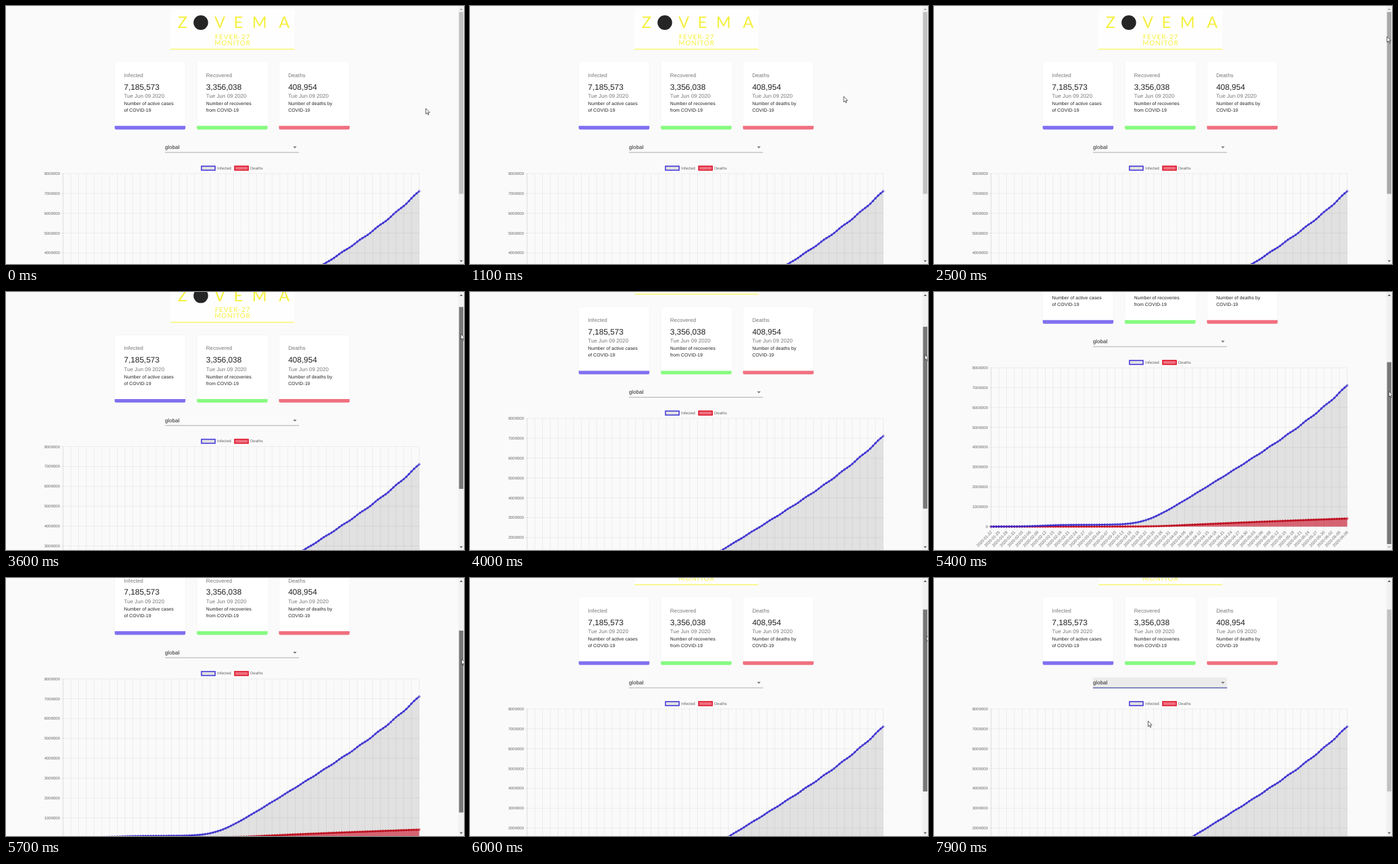
Recreate the animation shown at these times as an HTML page. Size 690 by 388 pixels, loop 8000 ms.

```html
<!DOCTYPE html>
<html lang="en">
<head>
<meta charset="utf-8">
<title>Case tracker</title>
<style>
  html, body { margin: 0; width: 100%; height: 100%; overflow: hidden; background: #fafafa; }
  svg { display: block; width: 690px; height: 388px; }
  text { font-family: "Liberation Sans", Arial, sans-serif; text-rendering: geometricPrecision; }
  .body { font-size: 8px; letter-spacing: .075px; }
  .soft { fill: #757575; }
  .dark { fill: #212121; }
  .count { font-size: 12px; }
  .note { font-size: 7px; letter-spacing: .075px; }
  .axis { font-size: 6px; fill: #666; }
  .logo { font-family: Lato, "Open Sans", sans-serif; fill: #f5f03c; text-anchor: middle; }
  .big { font-size: 24px; }
  .small { font-size: 10px; letter-spacing: 1px; }
  .card { filter: drop-shadow(0 .5px .7px rgba(0, 0, 0, .14)); }
</style>
</head>
<body>
<svg id="stage" viewBox="0 0 690 388"></svg>
<script>
const LOOP = 8000, STEP = 100;
const BLUE = '#3b2fd9', RED = '#dc0a1e', GREY = 'rgba(0,0,0,.1)', PINK = 'rgba(230,0,30,.55)';
const LEFT = 86, RIGHT = 622.5, TOP = 252, BASE = 490.8, DAYS = 138;
const MAX_SCROLL = 138, THUMB_TRAVEL = 96.5;
const PRESS = 3100, RELEASE = 6000, FOCUS = 7200;

const clamp = k => Math.max(0, Math.min(1, k));
const span = (t, from, to) => clamp((t - from) / (to - from));
const smooth = k => k * k * (3 - 2 * k);

// Growth in millions: flat until its onset, then rising
const onset = (day, start) => 4 * Math.log(1 + Math.exp((day - start) / 4));
function infected(day) {
  const s = onset(day, 59.6);
  const early = .09 / (1 + Math.exp((20 - day) / 4));
  const week = .0003 * s * Math.cos(2 * Math.PI * (day - 3) / 7);
  return early + .0798 * s + 2.6e-10 * s ** 5 + week;
}
const deaths = day => .0122 * onset(day, 66) ** .82;

// Pointer stops before and after the scrollbar drag: [ms, x, y]
const GRIP = [685.3, 49];
const ARRIVE = [[0, 632.5, 154], [400, 420, 295], [600, 305, 215], [900, 563, 136],
  [1500, 563, 136], [1700, 598, 335], [1900, 626.5, 240], [2500, 682.5, 46], [PRESS, ...GRIP]];
const LEAVE = [[RELEASE, 688, 87], [6800, 537, 151], [FOCUS, 400, 157],
  [7700, 361.5, 182.5], [7900, 322.5, 215]];

function along(stops, t) {
  let i = 1;
  while (i < stops.length - 1 && stops[i][0] < t) i++;
  const [a, b] = [stops[i - 1], stops[i]], k = span(t, a[0], b[0]);
  return [1, 2].map(n => a[n] + (b[n] - a[n]) * k);
}

const lift = t => span(t, 5450, RELEASE);
const scrollAt = t => MAX_SCROLL * smooth(span(t, 3190, 4930)) - 83 * lift(t);
const thumbShift = t => THUMB_TRAVEL * scrollAt(t) / MAX_SCROLL;

function pointerAt(t) {
  if (t < PRESS) return along(ARRIVE, t);
  if (t >= RELEASE) return along(LEAVE, t);
  return [GRIP[0] + 2.7 * lift(t), GRIP[1] + 1.04 * thumbShift(t)];
}

const px = day => LEFT + (RIGHT - LEFT) * day / DAYS;
const py = millions => BASE - (BASE - TOP) * millions / 8;
const rect = (x, y, w, h, fill, extra = '') =>
  `<rect x="${x}" y="${y}" width="${w}" height="${h}" fill="${fill}" ${extra}/>`;
const line = (x1, y1, x2, y2, color, w = .5) =>
  `<path d="M${x1} ${y1}L${x2} ${y2}" stroke="${color}" stroke-width="${w}"/>`;
const text = (x, y, cls, str, extra = '') =>
  `<text x="${x}" y="${y}" class="${cls}" ${extra}>${str}</text>`;

function logo() {
  const letters = [['Z', 266], ['V', 322], ['E', 350], ['M', 382], ['A', 419]];
  return rect(248, 4, 186.5, 62, '#fefefe') +
    letters.map(([c, x]) => text(x, 33, 'logo big', c)).join('') +
    '<circle cx="293.5" cy="25" r="11" fill="#252525"/>' +
    text(341.5, 49.8, 'logo small', 'FEVER-27') +
    text(341.5, 58.8, 'logo small', 'MONITOR') +
    line(248, 65, 434.5, 65, '#f8f470', 1.5);
}

function card(index, color, title, count, first, second) {
  const x = 163.8 + 123.7 * index, tx = x + 14;
  return `<g class="card">${rect(x, 84, 106.5, 101.7, '#fff', 'rx="2"')}</g>` +
    `<path d="M${x} 180.3h106.5v3.4q0 2 -2 2h-102.5q-2 0 -2 -2z" fill="${color}"/>` +
    text(tx, 106.8, 'body soft', title) + text(tx, 125.6, 'count dark', count) +
    text(tx, 138.1, 'body soft', 'Tue Jun 09 2020') +
    text(tx, 149.3, 'note dark', first) + text(tx, 159.3, 'note dark', second);
}

function select() {
  return rect(239.5, 204.5, 202, 16, 'rgba(0,0,0,.06)', 'id="focusFill"') +
    text(239.5, 215, 'body dark', 'global') +
    '<path d="M432.5 211.3h5.4l-2.7 2.8z" fill="#707070"/>' +
    line(239.5, 220.2, 441.5, 220.2, '#8c8c8c', .7) +
    rect(239.5, 219.7, 202, 1.1, '#3f51b5', 'id="focusLine"');
}

function grid() {
  const shade = first => first ? 'rgba(0,0,0,.25)' : 'rgba(0,0,0,.11)';
  let out = '';
  for (let m = 0; m <= 8; m++) {
    const y = py(m);
    out += line(LEFT - 5, y, RIGHT, y, shade(!m)) +
      text(LEFT - 5, y + 2, 'axis', m * 1e6, 'text-anchor="end"');
  }
  for (let d = 0; d <= DAYS; d += 3) {
    const x = px(d), date = new Date(Date.UTC(2020, 0, 22 + d)).toISOString().slice(0, 10);
    out += line(x, TOP, x, BASE + 5, shade(!d)) +
      text(0, 2, 'axis', date,
        `text-anchor="end" transform="translate(${x + .5} ${BASE + 7.5}) rotate(-46)"`);
  }
  return out;
}

function series(value, stroke, fill) {
  let path = '', dots = '';
  for (let d = 0; d <= DAYS; d++) {
    const x = px(d).toFixed(2), y = py(value(d)).toFixed(2);
    path += `${d ? 'L' : 'M'}${x} ${y}`;
    dots += `<circle cx="${x}" cy="${y}" r="1.5"/>`;
  }
  return `<path d="${path}V${BASE}H${LEFT}z" fill="${fill}"/>` +
    `<path d="${path}" fill="none" stroke="${stroke}" stroke-width="1.8"/>` +
    `<g fill="${GREY}" stroke="${stroke}" stroke-width=".7">${dots}</g>`;
}

function legend(x, stroke, fill, label) {
  return rect(x, 240.9, 20.5, 6, fill, `stroke="${stroke}" stroke-width="1.5"`) +
    text(x + 23.5, 245.7, 'axis', label);
}

document.getElementById('stage').innerHTML =
  rect(0, 0, 690, 388, '#fafafa') +
  '<g id="page">' + logo() +
  card(0, '#8070f0', 'Infected', '7,185,573', 'Number of active cases', 'of COVID-19') +
  card(1, '#86fb80', 'Recovered', '3,356,038', 'Number of recoveries', 'from COVID-19') +
  card(2, '#f07080', 'Deaths', '408,954', 'Number of deaths by', 'COVID-19') +
  select() +
  legend(294.5, BLUE, GREY, 'Infected') + legend(344.5, RED, PINK, 'Deaths') +
  grid() + series(deaths, RED, PINK) + series(infected, BLUE, GREY) + '</g>' +
  rect(681.5, 0, 8.5, 388, '#f1f1f1') +
  rect(682.5, 9, 6.5, 273.5, '#c1c1c1', 'id="thumb"') +
  '<path id="up" d="M683.5 6l2.3 -2.5l2.3 2.5z"/>' +
  '<path id="down" d="M683.5 382.5l2.3 2.5l2.3 -2.5z"/>' +
  '<path id="pointer" d="M0 0V8.4L1.9 6.7L3.2 9.7L4.5 9.1L3.2 6.2H5.9Z" ' +
  'fill="#fff" stroke="#222" stroke-width=".7"/>';

function set(id, attrs) {
  const node = document.getElementById(id);
  for (const name in attrs) node.setAttribute(name, attrs[name]);
}

function thumbColor(t) {
  if (t >= PRESS && t <= RELEASE) return '#787878';
  return t >= 2500 && t < PRESS ? '#a8a8a8' : '#c1c1c1';
}

function draw(t) {
  const scroll = scrollAt(t), focus = span(t, FOCUS - STEP, FOCUS + STEP);
  const arrow = (active) => ({ fill: active ? '#505050' : '#a3a3a3' });
  set('page', { transform: `translate(0 ${-scroll})` });
  set('thumb', { y: 9 + thumbShift(t), fill: thumbColor(t) });
  set('up', arrow(scroll > 0));
  set('down', arrow(scroll < MAX_SCROLL));
  set('pointer', { transform: `translate(${pointerAt(t)})` });
  set('focusFill', { opacity: focus > 0 ? 1 : 0 });
  set('focusLine', { x: 239.5 + 101 * (1 - focus), width: 202 * focus });
}

const start = performance.now();
function tick(now) {
  const t = Math.max(0, now - start) % LOOP;
  draw(Math.floor(t / STEP) * STEP);
  requestAnimationFrame(tick);
}
draw(0);
requestAnimationFrame(tick);
</script>
</body>
</html>
```
